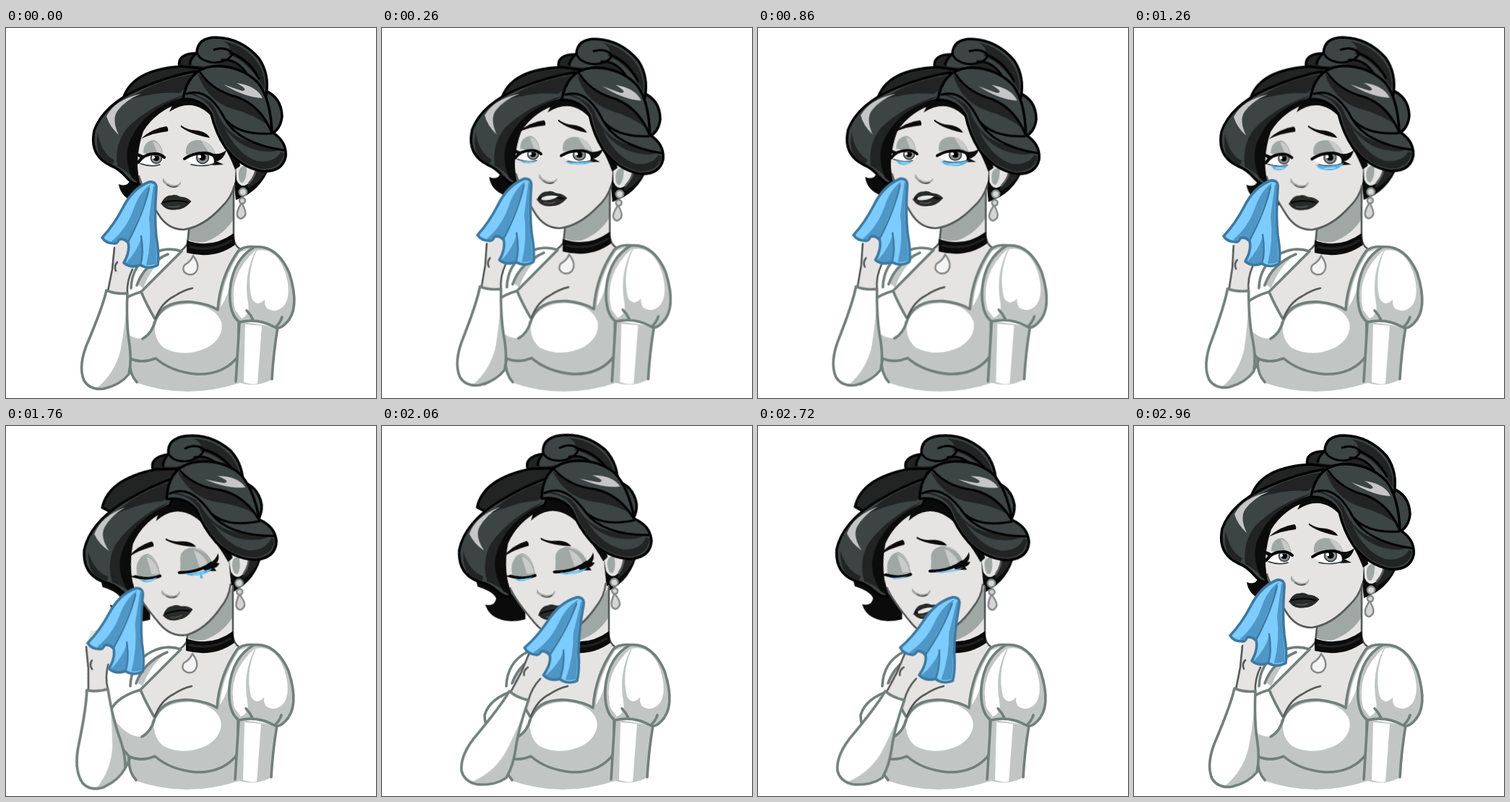
Write an HTML page without scripts that moves like this. It is 512 px wide and 512 px high and loops after 3.04 s.

```html
<!DOCTYPE html>
<html lang="en">
<head>
<meta charset="utf-8">
<title>Tearful lady</title>
<style>
html, body { margin: 0; width: 100%; height: 100%; overflow: hidden; background: #fff; }
svg { display: block; width: 100vw; height: 100vh; }
path, circle, ellipse { stroke-linejoin: round; stroke-linecap: round; }

.hair { fill: #3c4444; stroke: #000; stroke-width: 3.5; }
.dark { fill: #222323; }
.ink { fill: #0b0b0b; }
.lock { fill: none; stroke: #000; stroke-width: 3; }
.shine { fill: #c6c6c6; }
.skin { fill: #e6e3e3; }
.shade { fill: #a0a8a6; }
.edge { fill: none; stroke: #555959; stroke-width: 2.6; }
.white { fill: #fff; }
.grey { fill: #c1c6c5; }
.seam { fill: none; stroke: #717f7b; stroke-width: 3.6; }
.jewel { fill: #d5d5d5; stroke: #858888; stroke-width: 2.4; }
.tear { fill: #55b4e9; }
.lash { fill: none; stroke: #060606; stroke-width: 4; }
.light { fill: #7dccff; }
.deep { fill: #4e97c6; }
.hem { fill: none; stroke: #3d789f; stroke-width: 3.6; }
.fold { stroke-width: 2.4; }

.head, .bun, .curl, .sweep, .face, .look, .brows, .body, .arm, .cloth, .open, .shut, .tears, .drip, .teeth {
  animation: 3040ms ease-in-out infinite;
}
.head { animation-name: head; transform-origin: 285px 270px; }
.bun { animation-name: bun; }
.curl { animation-name: curl; }
.sweep { animation-name: sweep; }
.face { animation-name: face; }
.look { animation-name: look; }
.brows { animation-name: brows; }
.body { animation-name: breathe; transform-origin: 250px 500px; }
.arm { animation-name: arm; transform-origin: 130px 485px; }
.cloth { animation-name: cloth; transform-origin: 172px 272px; }
.open { animation-name: open; transform-origin: 240px 187px; }
.shut { animation-name: shut; }
.tears { animation-name: tears; transform-origin: 240px 189px; }
.drip { animation-name: drip; }
.teeth { animation-name: teeth; transform-origin: 233px 240px; }

@keyframes head {
  0%, 18.4%, 36.8%, 97.4%, 100% { transform: none; }
  8.55%, 28.3% { transform: translate(0, 2px) rotate(1.2deg); }
  41.4% { transform: rotate(-.4deg); }
  52.6%, 57.9% { transform: translate(1px, -4px) rotate(-8deg); }
  69% { transform: translate(0, -5px) rotate(-8.2deg); }
  79.6%, 90% { transform: translate(1px, -4px) rotate(-7.6deg); }
}
/* depth shifts while the head is bowed */
@keyframes bun {
  0%, 41.4%, 97.4%, 100% { transform: none; }
  52.6%, 90% { transform: translate(-8px, 2px); }
}
@keyframes curl {
  0%, 18.4%, 36.8%, 41.4%, 97.4%, 100% { transform: none; }
  8.55%, 28.3% { transform: translate(-9px, -9px); }
  52.6%, 90% { transform: translate(-9px, 16px); }
}
@keyframes sweep {
  0%, 41.4%, 97.4%, 100% { transform: none; }
  52.6%, 90% { transform: translate(0, 10px); }
}
@keyframes face {
  0%, 18.4%, 36.8%, 41.4%, 97.4%, 100% { transform: none; }
  8.55%, 28.3% { transform: translate(0, -3px); }
  52.6%, 90% { transform: translate(0, 9px); }
}
@keyframes look {
  0%, 18.4%, 36.8%, 41.4%, 97.4%, 100% { transform: none; }
  8.55%, 28.3% { transform: translate(-1px, -3px); }
  52.6%, 69% { transform: translate(3px, 5px); }
  79.6%, 90% { transform: translate(1px, 3px); }
}
@keyframes brows {
  0%, 41.4%, 97.4%, 100% { transform: none; }
  8.55%, 28.3% { transform: translate(0, -3px); }
  52.6%, 90% { transform: translate(-9px, 3px); }
}
@keyframes breathe {
  0%, 18.4%, 36.8%, 97.4%, 100% { transform: none; }
  8.55%, 28.3% { transform: scale(1.003, 1.01); }
  52.6%, 90% { transform: translate(-1px, 0); }
}
@keyframes arm {
  0%, 18.4%, 36.8%, 97.4%, 100% { transform: none; }
  8.55%, 28.3% { transform: translate(0, -5px) rotate(-1.6deg); }
  41.4% { transform: translate(-4px, -2px) rotate(-2.6deg); }
  52.3% { transform: translate(-5px, 3px) rotate(-19deg); animation-timing-function: ease-in; }
  57.9% { transform: translate(-3px, 2px) rotate(-11.5deg); animation-timing-function: ease-out; }
  68%, 79.6%, 89% { transform: translate(2px, -4px) rotate(17deg); }
  74% { transform: translate(2px, -3px) rotate(16.3deg); }
}
@keyframes cloth {
  0%, 18.4%, 36.8%, 97.4%, 100% { transform: none; }
  8.55%, 28.3% { transform: translate(-1px, -4px) rotate(-.6deg); }
  41.4% { transform: translate(-9px, -2px); }
  52.3% { transform: translate(-50px, 15px) rotate(-4deg); animation-timing-function: ease-in; }
  57.9% { transform: translate(-20px, 11px) rotate(1deg); animation-timing-function: ease-out; }
  68%, 79.6%, 89% { transform: translate(66px, 21px) rotate(6deg); }
  74% { transform: translate(64px, 23px) rotate(5deg); }
}
@keyframes open {
  0%, 44%, 96%, 100% { transform: none; opacity: 1; }
  8.55%, 28.3% { transform: scaleY(.92); }
  49.4%, 92% { transform: scaleY(.2); opacity: 1; }
  49.5%, 91.9% { transform: scaleY(.2); opacity: 0; }
}
@keyframes shut {
  0%, 49.4%, 92%, 100% { opacity: 0; }
  49.5%, 91.9% { opacity: 1; }
}
@keyframes tears {
  0%, 97.4%, 100% { transform: scaleY(.2); opacity: .35; }
  8.55% { transform: scaleY(.6); opacity: 1; }
  28.3% { transform: scaleY(.9); opacity: 1; }
  41.4% { transform: scaleY(1.1); opacity: 1; }
  52.6%, 57.9% { transform: scaleY(.75); opacity: 1; }
  79.6%, 91% { transform: scaleY(.45); opacity: .9; }
}
@keyframes drip {
  0%, 53% { transform: translate(0, -7px); opacity: 0; }
  54% { transform: translate(0, -6px); opacity: 1; }
  57.9% { transform: none; opacity: 1; }
  66% { transform: translate(0, 28px); opacity: 1; }
  69%, 100% { transform: translate(0, 34px); opacity: 0; }
}
@keyframes teeth {
  0%, 18.4%, 36.8%, 70%, 97.4%, 100% { transform: scale(.6, 0); }
  8.55%, 28.3%, 76%, 89% { transform: none; }
}
</style>
</head>
<body>
<svg viewBox="0 0 512 512">
<defs>
  <clipPath id="eyes">
    <path d="M184 187Q194 172 217 178Q219 186 212 190Q198 193 184 187ZM247 182Q257 171 277 172Q291 176 292 184Q281 192 264 190Z"/>
  </clipPath>
</defs>

<!-- back hair and bun -->
<g class="head">
  <g class="bun">
    <path class="hair" d="M357 86Q381 95 382 122Q380 141 366 147L340 100Z"/>
    <path class="hair dark" d="M240 54Q236 35 264 35L300 70H250Z"/>
    <path class="hair" d="M264 34Q265 13 291 13Q326 14 350 42Q365 64 360 93L300 62L262 58Q246 52 264 34Z"/>
    <path class="dark" d="M301 18Q330 24 346 45Q359 61 358 85Q336 46 307 36Q315 27 301 18ZM252 50Q280 58 303 45Q326 47 339 73L298 61L260 58Z"/>
    <path class="lock" d="M264 34Q269 47 290 48Q311 45 313 35Q304 25 288 30M299 44Q324 42 339 73M313 35Q337 45 350 70"/>
    <path class="hair dark" d="M163 95Q177 57 244 53L285 58V115H190Z"/>
  </g>
  <path class="curl ink" d="M145 150L149 190Q170 200 172 210Q168 221 156 216Q158 234 180 242Q192 246 208 244L220 150Z"/>
  <path class="ink" d="M312 180L318 238Q352 227 366 190L345 160Z"/>
  <path class="dark" d="M338 180L334 222Q353 214 362 194Z"/>
</g>

<!-- neck, chest, dress -->
<g class="body">
  <path class="grey" d="M146 395L140 490Q165 482 173 462L180 400Z"/>
  <path class="white" d="M243 309Q220 302 201 313Q178 325 172 352L176 362Q149 374 143 400L152 450L207 405L242 310Z"/>
  <path class="grey" d="M181 354Q197 324 224 312Q200 332 190 360Z"/>
  <path class="skin" d="M253 262L251 299Q247 306 241 310L187 364L207 406L294 392L323 306Q316 302 315 290V220Z"/>
  <path class="shade" d="M254 273Q292 264 315 222V264Q302 286 276 296Q262 298 252 293Z"/>
  <path class="edge" d="M254 270L251 299Q247 305 241 309M315 222L315 290Q316 301 324 306"/>
  <path class="grey" d="M148 402Q170 432 207 404Q220 375 258 379Q281 382 293 390Q297 346 323 308L345 303L322 408V453L324 491Q250 515 181 491Q172 475 171 457Q155 440 148 402Z"/>
  <path class="white" d="M146 398Q165 372 187 366Q197 390 203 403Q203 425 188 430Q165 430 146 398ZM206 409Q219 381 255 382Q289 384 298 407Q302 428 279 442Q247 457 219 443Q204 431 206 409ZM297 386Q300 347 324 310L337 306Q312 327 309 360Q304 376 297 386Z"/>
  <path class="seam" d="M173 360Q174 327 203 312Q223 302 243 309M181 356Q191 327 224 313M242 310L187 365Q195 384 207 404M187 365Q150 376 143 400Q143 425 171 457M207 404Q218 377 256 379Q281 382 293 390Q296 345 321 309Q329 301 346 303M207 404Q202 423 189 430M322 408V453Q303 480 264 479Q229 476 207 457Q188 465 171 457Q170 478 181 490M172 461Q164 482 142 493M322 453L319 487"/>
  <path class="edge" d="M207 402Q215 380 233 371Q245 363 258 360"/>
  <path class="grey" d="M323 406L318 489Q343 499 367 487L376 414Z"/>
  <path class="white" d="M331 410L329 490Q340 494 348 492L354 412Z"/>
  <path class="seam" d="M323 408L318 489M376 414Q370 450 368 486"/>
  <path class="grey" d="M323 407Q308 396 310 362Q314 320 344 303Q375 300 392 339Q408 389 387 409Q378 418 372 414Q349 401 323 407Z"/>
  <path class="white" d="M317 390Q306 342 346 307Q328 341 335 381Q338 397 326 402ZM347 308Q373 303 386 337Q396 368 385 384Q374 396 361 388Q353 375 366 366Q349 391 340 374Q332 340 347 308Z"/>
  <path class="seam" d="M323 407Q308 396 310 362Q314 320 344 303Q375 300 392 339Q408 389 387 409Q378 418 372 414Q349 401 323 407M342 404Q339 397 333 391M374 413Q380 407 382 400"/>
  <path class="ink" d="M250 294Q285 306 315 284L317 300Q288 321 250 311Z"/>
  <path d="M255 303Q286 310 312 294" fill="none" stroke="#222" stroke-width="3"/>
  <path class="jewel" style="fill:#f4f4f4" d="M259 315Q267 326 265 333Q262 343 252 341Q242 337 247 328Q256 323 259 315Z"/>
</g>

<!-- face and front hair -->
<g class="head">
  <path class="skin" d="M318 190Q333 168 345 182Q350 199 337 214Q325 224 319 210Z"/>
  <path class="shade" d="M322 204Q321 191 333 190Q334 207 328 214Q322 215 322 204Z"/>
  <path class="edge" d="M336 215Q347 203 346 190"/>
  <g class="face">
    <path class="skin" d="M186 140Q177 180 185 213L212 260Q225 280 246 279Q273 275 297 249Q312 235 317 212L320 140L265 85H235Q200 103 186 140Z"/>
    <path class="edge" d="M184 205Q189 223 211 258Q224 279 246 279Q273 275 297 249Q312 235 316 218"/>
    <g class="look">
      <path class="shade" d="M190 173Q190 156 205 155Q216 160 218 178ZM249 175Q247 157 264 155Q285 155 291 178Z"/>
      <path d="M203 157Q213 157 217 175L209 172ZM270 156Q284 158 289 174L280 171Z" fill="#c9cac9"/>
      <g class="open">
        <path class="white" d="M184 187Q194 172 217 178Q219 186 212 190Q198 193 184 187ZM247 182Q257 171 277 172Q291 176 292 184Q281 192 264 190Z"/>
        <g clip-path="url(#eyes)">
          <g fill="#8b9193" stroke="#34383a" stroke-width="1.5">
            <circle cx="208" cy="180" r="7.5"/><circle cx="272" cy="179" r="8.5"/>
          </g>
          <circle cx="208" cy="180" r="4"/><circle cx="272" cy="179" r="4.5"/>
          <circle class="white" cx="204" cy="179" r="2"/><circle class="white" cx="268" cy="178" r="2.2"/>
        </g>
        <path class="lash" d="M183 186Q191 174 206 174Q214 174 219 179M247 181Q259 172 277 173Q289 175 293 182"/>
        <path class="ink" d="M188 182L175 171Q184 173 192 177ZM186 188L177 183L190 189ZM282 173Q295 177 305 169Q301 183 291 184L301 189L285 190Q292 184 282 173Z"/>
        <path d="M187 188Q202 193 213 189M256 189Q274 193 290 187" fill="none" stroke="#222" stroke-width="1.4"/>
      </g>
      <g class="shut">
        <path class="shade" d="M187 187Q184 161 202 157Q216 160 219 188ZM247 187Q247 160 267 157Q288 160 293 183Q271 192 247 187Z"/>
        <path d="M203 159Q215 164 217 185L207 184ZM269 159Q282 166 286 181L274 184Z" fill="#c9cac9"/>
        <path class="lash" d="M184 184Q201 192 218 188M245 187Q271 191 291 180"/>
        <path class="ink" d="M192 189L173 182L187 183ZM276 184Q295 181 302 168Q303 177 298 181L302 182Q298 188 294 187L296 192L281 190Z"/>
      </g>
      <g class="tears">
        <path class="tear" d="M189 189Q203 193 214 189Q207 198 195 195ZM252 189Q271 193 291 187Q284 197 269 196Q257 196 252 189Z"/>
        <path d="M197 193L207 193M264 194L278 193" stroke="#b3e2ff" stroke-width="1.5"/>
      </g>
      <path class="drip tear" d="M274 192Q278 198 275 200Q271 199 274 192Z"/>
      <path class="brows ink" d="M222 136Q202 139 187 153Q205 145 224 143Q225 138 222 136ZM242 137Q255 147 282 152Q277 142 257 141Q248 139 243 135Q241 134 242 137Z"/>
      <path class="shade" d="M218 207Q219 214 229 217Q239 219 242 212Q243 218 235 221Q226 222 219 215Q215 212 218 207Z"/>
      <path d="M223 217Q229 222 237 219" fill="none" stroke="#555" stroke-width="1.5"/>
      <path d="M215 243Q220 231 230 232Q234 230 241 234Q250 234 256 240Q247 251 235 251Q221 253 215 243Z" fill="#292a2a" stroke="#1b1b1b"/>
      <path d="M218 241Q235 237 251 241" fill="none" stroke="#050505" stroke-width="2"/>
      <path d="M225 247Q233 249 240 246" fill="none" stroke="#555" stroke-width="1.6"/>
      <path class="teeth" d="M221 240Q232 235 244 238Q234 245 221 243Z" fill="#e7e7e7"/>
    </g>
  </g>

  <path class="ink" d="M283 118L302 165Q310 178 317 196L324 191L322 175L290 105Z"/>
  <g class="sweep">
    <path class="ink" d="M226 116Q262 92 291 130L285 70H248Z"/>
    <path class="hair" d="M262 60Q226 66 185 84Q135 106 122 142Q115 176 144 190Q157 195 166 206Q177 218 183 215Q175 178 188 142Q207 112 248 97Q259 78 262 60Z"/>
    <path class="dark" d="M248 92Q199 107 168 138Q150 160 154 191Q166 197 178 209Q175 176 186 142Q204 114 248 92Z"/>
    <path class="ink" d="M244 96Q190 113 172 155Q162 177 174 207L184 215Q178 178 190 143Q207 114 244 103Z"/>
    <path class="dark" d="M259 64Q204 73 169 99Q213 87 240 90Q253 82 259 64ZM127 145Q132 174 150 183L147 189Q121 181 127 145Z"/>
    <path class="shine" d="M187 91Q151 99 139 122Q143 136 156 148Q146 127 154 115Q166 99 187 91Z"/>
  </g>

  <path class="hair" d="M245 98Q252 57 286 53Q324 51 349 76Q366 98 368 144Q389 157 387 178Q382 200 354 198Q325 193 304 166Q290 145 284 119Q272 98 245 98Z"/>
  <path class="dark" d="M265 62Q286 84 319 94Q351 105 366 137Q342 119 314 112Q278 101 265 62ZM250 91Q274 87 290 112Q303 149 341 159Q368 163 385 174Q380 195 356 195Q326 191 306 164Q293 146 287 117Q276 95 250 91Z"/>
  <path d="M302 137Q321 165 352 170Q369 173 382 168Q374 188 347 184Q319 174 302 137ZM257 81Q285 91 296 112Q276 97 254 88Z" fill="#3c4444"/>
  <path class="lock" d="M269 62Q286 87 321 96Q352 108 367 143M303 126Q323 149 367 146M303 126Q322 160 384 169M250 91Q280 81 303 126"/>
  <path class="shine" d="M301 78Q330 96 355 97Q347 80 319 76Q337 86 327 87Q317 84 301 78Z"/>

  <path class="jewel" d="M326 242Q333 254 331 259Q325 268 320 260Q318 255 326 242Z"/>
  <circle class="jewel" cx="328" cy="227" r="5.2"/>
  <circle class="jewel" cx="327" cy="239" r="4"/>
</g>

<!-- raised arm -->
<g class="arm">
  <path class="skin" d="M150 303L147 334L140 366H168Q167 350 175 336L190 318L186 284L160 284Z"/>
  <path class="edge" d="M150 304L147 334L141 364M168 367Q167 350 175 334M152 336Q149 329 154 324"/>
  <path class="white" d="M139 363Q153 369 168 367Q166 409 171 439Q174 462 170 479Q158 494 136 499Q117 502 108 488Q100 469 111 440Q134 386 139 363Z"/>
  <path class="grey" d="M167 385Q166 412 171 439Q174 462 170 479Q158 494 136 499L126 498Q150 478 158 448Q164 418 167 385Z"/>
  <path class="seam" d="M139 363Q153 369 168 367Q166 409 171 439Q174 462 170 479Q158 494 136 499Q117 502 108 488Q100 469 111 440Q134 386 139 363Z"/>
</g>

<!-- handkerchief -->
<g class="cloth">
  <path class="light" d="M198 213Q209 212 208 223Q205 261 208 289Q212 312 210 328Q197 335 186 328Q173 333 163 325Q172 309 169 297Q162 290 156 293Q154 299 149 298Q138 298 133 290Q149 273 161 250Q175 222 198 213Z"/>
  <path class="deep" d="M200 216Q189 251 169 295Q160 289 155 292L151 297L146 295Q166 279 176 252Q184 228 200 216ZM204 218Q208 219 206 229Q203 259 206 286Q209 312 208 326Q200 329 194 328Q202 296 198 263ZM187 291Q191 315 185 327Q174 331 166 325Q181 310 187 291Z"/>
  <path class="hem" d="M198 213Q209 212 208 223Q205 261 208 289Q212 312 210 328Q197 335 186 328Q173 333 163 325Q172 309 169 297Q162 290 156 293Q154 299 149 298Q138 298 133 290Q149 273 161 250Q175 222 198 213Z"/>
  <path class="hem fold" d="M198 222Q190 256 169 296M187 288Q191 312 186 328"/>
</g>
</svg>
</body>
</html>
```
